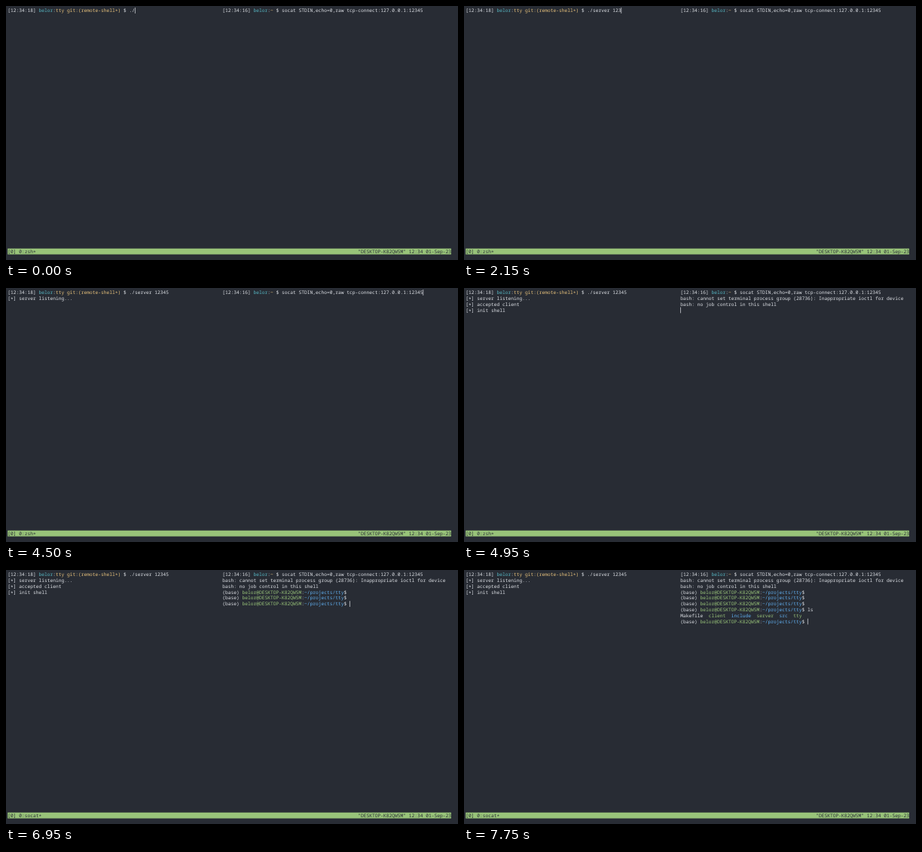
An HTML page for the animation above (8 s loop, 600 by 338 pixels).

```html
<!DOCTYPE html>
<html lang="en">
<head>
<meta charset="utf-8">
<title>Remote shell session</title>
<style>
  html, body { margin: 0; width: 100%; height: 100%; overflow: hidden; background: #282c34; }
  svg { display: block; }
  text {
    font: 6.25px "Noto Sans Mono", "DejaVu Sans Mono", monospace;
    font-variant-ligatures: none;
    text-rendering: geometricPrecision;
    white-space: pre;
    fill: #dcdfe4;
  }
  .cyan { fill: #56b6c2; }
  .yellow { fill: #e5c07b; }
  .green { fill: #98c379; }
  .blue { fill: #61afef; }
  .dark { fill: #282c34; }
</style>
</head>
<body>
<svg id="screen" width="600" height="338" viewBox="0 0 600 338"></svg>
<script>
const LOOP = 8000, CELL = 3.75, LINE = 7.82, TOP = 2.1, STATUS = 41;
const LEFT = 2.2, RIGHT = LEFT + 76 * CELL;
const USER = "belor", HOST = "DESKTOP-K82QW5M";
const screen = document.getElementById("screen");
const items = [];

function add(parent, tag, attrs) {
  const node = document.createElementNS("http://www.w3.org/2000/svg", tag);
  for (const key in attrs) node.setAttribute(key, attrs[key]);
  return parent.appendChild(node);
}

// Markup: "{green:word}" colours a run; asterisks sit on the line's middle.
function print(pane, row, col, markup, from = 0, to = LOOP) {
  const node = add(screen, "text", { x: pane + col * CELL, y: TOP + row * LINE + 5.95 });
  let shift = 0;
  for (const [, color, colored, plain] of markup.matchAll(/\{(\w+):([^}]*)\}|([^{]+)/g)) {
    for (const part of (colored ?? plain).split(/(\*)/)) {
      if (!part) continue;
      const want = part === "*" ? 1.2 : 0;
      const span = add(node, "tspan", { class: color || "", dy: want - shift });
      span.textContent = part;
      shift = want;
    }
  }
  items.push({ node, from, to });
}

function type(pane, row, col, keys) {
  for (const [time, chars] of keys) {
    print(pane, row, col, chars, time);
    col += chars.length;
  }
}

// Status bar
add(screen, "rect", { x: LEFT, y: TOP + STATUS * LINE, width: 157 * CELL, height: LINE, fill: "#98c379" });
const windowName = (name, from, to) => print(LEFT, STATUS, 0, `{dark:[0] 0:${name}*}`, from, to);
windowName("zsh", 0, 3900);
windowName("./server", 3900, 4100);
windowName("zsh", 4100, 5750);
windowName("socat", 5750);
print(LEFT, STATUS, 124, `{dark:"${HOST}" 12:34 01-Sep-23}`);

// Server pane
print(LEFT, 0, 0, `[12:34:18] {cyan:${USER}}:{yellow:tty} {yellow:git:(remote-shell*)} $ ./`);
type(LEFT, 0, 45, [[450, "s"], [650, "e"], [850, "rver "], [1650, "1"],
  [1800, "2"], [2150, "3"], [2350, "4"], [2550, "5"]]);
print(LEFT, 1, 0, "[*] server listening...", 2950);
print(LEFT, 2, 0, "[*] accepted client", 4950);
print(LEFT, 3, 0, "[*] init shell", 4950);

// Client pane
print(RIGHT, 0, 0, `[12:34:16] {cyan:${USER}}:{yellow:~} $ socat STDIN,echo=0,raw tcp-connect:127.0.0.1:12345`);
print(RIGHT, 1, 0, "bash: cannot set terminal process group (28736): Inappropriate ioctl for device", 4950);
print(RIGHT, 2, 0, "bash: no job control in this shell", 4950);
const prompt = (row, time) =>
  print(RIGHT, row, 0, `(base) {green:${USER}@${HOST}}:{blue:~/projects/tty}$ `, time);
prompt(3, 5750);
prompt(4, 6750);
prompt(5, 6950);
prompt(6, 7100);
type(RIGHT, 6, 45, [[7500, "l"], [7600, "s"]]);
print(RIGHT, 7, 0, "Makefile  {green:client}  {blue:include}  {green:server}  {blue:src}  {green:tty}", 7750);
prompt(8, 7750);

// Cursor stops: time, pane, row, column
const stops = [
  [0, LEFT, 0, 45], [450, LEFT, 0, 46], [650, LEFT, 0, 47], [850, LEFT, 0, 52],
  [1650, LEFT, 0, 53], [1800, LEFT, 0, 54], [2150, LEFT, 0, 55], [2350, LEFT, 0, 56],
  [2550, LEFT, 0, 57], [2950, LEFT, 2, 0], [4100, RIGHT, 0, 71], [4950, RIGHT, 3, 0],
  [5750, RIGHT, 3, 45], [6750, RIGHT, 4, 45], [6950, RIGHT, 5, 45], [7000, RIGHT, 6, 0],
  [7100, RIGHT, 6, 45], [7500, RIGHT, 6, 46], [7600, RIGHT, 6, 47], [7750, RIGHT, 8, 45]
];
const cursor = add(screen, "rect", { width: 0.7, height: LINE, fill: "#dcdfe4" });

function draw(now) {
  const t = now % LOOP;
  for (const { node, from, to } of items)
    node.style.visibility = t >= from && t < to ? "visible" : "hidden";
  const [, pane, row, col] = stops.findLast(stop => stop[0] <= t);
  cursor.setAttribute("x", pane + col * CELL);
  cursor.setAttribute("y", TOP + row * LINE);
}

const start = performance.now();
function tick() {
  draw(performance.now() - start);
  requestAnimationFrame(tick);
}
tick();
</script>
</body>
</html>
```
